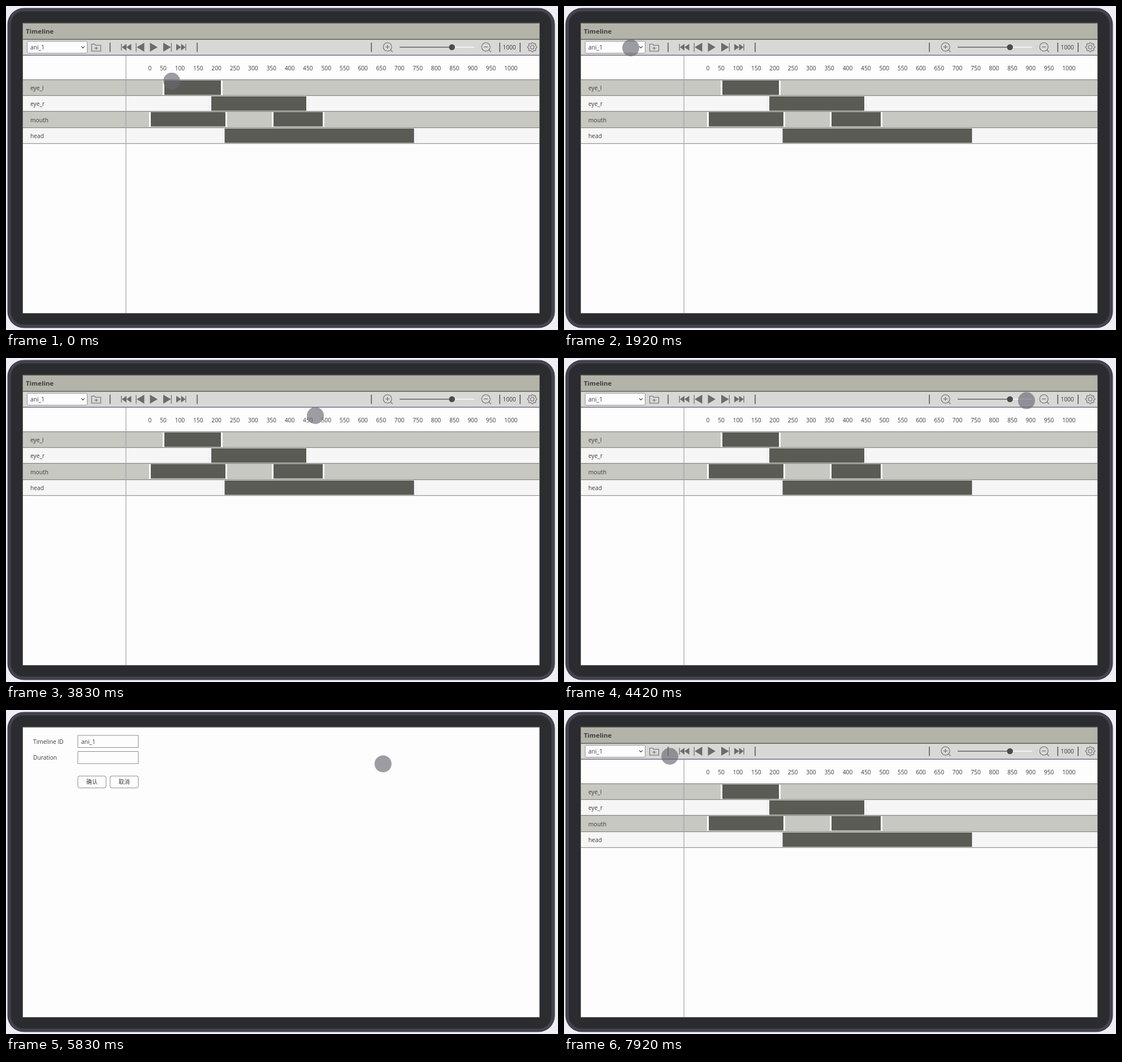
These frames come from a looping animation (976x574 px, 8000 ms). An HTML page with a canvas:

```html
<!DOCTYPE html>
<html lang="en">
<head>
<meta charset="utf-8">
<title>Timeline editor</title>
<style>
  html, body { margin: 0; width: 100%; height: 100%; overflow: hidden; background: #eeeef6; }
  canvas { display: block; width: 976px; height: 574px; }
</style>
</head>
<body>
<canvas id="stage" width="976" height="574"></canvas>
<script>
const ctx = document.getElementById('stage').getContext('2d');
const FONT = '"Open Sans", "Noto Sans", "Noto Sans CJK SC", sans-serif';
const INK = '#3c3c3c', ICON = '#6c6c6a', WHITE = '#fdfdfe';
const STEP = 250 / 3, STEPS = 96;

// Pointer path: [step, x, y]
const PATH = [
  [0, 293, 133], [9, 121, 72], [21, 121, 72], [24, 117, 75], [28, 112, 73],
  [36, 112, 73], [43, 640, 114], [46, 547, 102], [49, 385, 158], [54, 868, 66],
  [56, 853, 70], [59, 900, 53], [61, 936, 60], [62, 928, 67], [64, 930, 74],
  [66, 930, 74], [76, 182, 135], [82, 164, 130], [86, 164, 130], [91, 232, 96],
  [95, 187, 82]
];

function rect(x, y, w, h, color) {
  ctx.fillStyle = color;
  ctx.fillRect(x, y, w, h);
}

function round(x, y, w, h, r, fill, stroke) {
  ctx.beginPath();
  ctx.roundRect(x, y, w, h, r);
  if (fill) { ctx.fillStyle = fill; ctx.fill(); }
  if (stroke) { ctx.strokeStyle = stroke; ctx.lineWidth = 1; ctx.stroke(); }
}

function text(s, x, y, size = 10.25, weight = 400, align = 'left') {
  ctx.font = `${weight} ${size}px ${FONT}`;
  ctx.textAlign = align;
  ctx.fillStyle = INK;
  ctx.fillText(s, x, y);
}

function poly(points, close) {
  ctx.beginPath();
  points.forEach(([x, y]) => ctx.lineTo(x, y));
  if (close) ctx.closePath();
}

function line(points, color = ICON, width = 1.1) {
  poly(points);
  ctx.strokeStyle = color;
  ctx.lineWidth = width;
  ctx.stroke();
}

function disc(x, y, r, color) {
  ctx.beginPath();
  ctx.arc(x, y, r, 0, Math.PI * 2);
  ctx.fillStyle = color;
  ctx.fill();
}

function ring(x, y, r) {
  ctx.beginPath();
  ctx.arc(x, y, r, 0, Math.PI * 2);
  ctx.strokeStyle = ICON;
  ctx.lineWidth = 1.1;
  ctx.stroke();
}

// Triangle from its flat side to its tip
function arrow(base, tip, half) {
  poly([[base, 73 - half], [tip, 73], [base, 73 + half]], true);
  ctx.fillStyle = ICON;
  ctx.fill();
}

function tablet() {
  rect(0, 0, 976, 574, '#eeeef6');
  round(2.5, 3.5, 968, 567, 29, '#42444a');
  round(8.5, 9.5, 956, 555, 23, '#2b2c2f');
  rect(29, 29.5, 915, 515.5, '#62625a');
  rect(30, 31, 913, 513, WHITE);
}

function zoomIcon(x, plus) {
  ring(x, 72.5, 7.5);
  line([[x + 5.4, 77.8], [x + 9, 81.5]]);
  line([[x - 3.5, 72.5], [x + 3.5, 72.5]]);
  if (plus) line([[x, 69], [x, 76]]);
}

function gear(x, y) {
  const pts = [];
  for (let i = 0; i < 32; i++) {
    const r = i % 4 < 2 ? 8.3 : 6.5;
    const a = (i + (i % 2 ? -0.1 : 0.1)) * Math.PI / 16 - Math.PI / 32;
    pts.push([x + r * Math.cos(a), y + r * Math.sin(a)]);
  }
  poly(pts, true);
  ctx.strokeStyle = ICON;
  ctx.lineWidth = 1.1;
  ctx.stroke();
  ring(x, y, 3.2);
}

function toolbar() {
  rect(30, 31, 913, 27, '#b4b3aa');
  rect(30, 58, 913, 2, '#77776f');
  rect(30, 60, 913, 27, '#d8d8d6');
  rect(30, 86.5, 913, 1.5, '#77738a');
  text('Timeline', 35, 49, 11.4, 700);

  round(37.5, 62.5, 106, 21, 1, WHITE, '#96969a');
  text('ani_1', 43, 77);
  line([[133.3, 71.5], [136, 74.3], [138.7, 71.5]], '#444', 1.2);

  poly([[151.5, 67.5], [156.5, 67.5], [158.5, 69.5], [167.5, 69.5], [167.5, 80], [151.5, 80]], true);
  ctx.strokeStyle = ICON;
  ctx.lineWidth = 1.1;
  ctx.stroke();
  line([[156.5, 74.8], [162.5, 74.8]]);
  line([[159.5, 71.8], [159.5, 77.8]]);

  for (const x of [184, 338, 646, 873, 909]) rect(x - 0.7, 65, 1.4, 16.5, '#4a4a4a');

  rect(203.5, 67, 1.3, 12, ICON);
  arrow(213, 205, 6);
  arrow(221.5, 213, 6);
  rect(229.5, 65.5, 1.2, 15.5, ICON);
  arrow(244.5, 231, 8);
  arrow(254.5, 268, 8);
  arrow(278, 291.5, 8);
  rect(291.8, 65.5, 1.2, 15.5, ICON);
  arrow(301, 309.5, 6);
  arrow(309.5, 317.5, 6);
  rect(317.3, 67, 1.3, 12, ICON);

  zoomIcon(674.5, true);
  rect(696, 72.3, 92, 1.4, '#5c5c5c');
  rect(788, 72, 40, 2, '#f3f3f3');
  disc(788.5, 73, 5.3, '#4c4c4c');
  zoomIcon(848.5, false);
  text('1000', 890, 77, 10.25, 400, 'center');
  gear(930.5, 73);
}

function ruler() {
  const digit = 5.85, gap = 14.8;
  let x = 251.5;
  for (let v = 0; v <= 1000; v += 50) {
    const w = String(v).length * digit;
    text(String(v), x + w / 2, 113.5, 10.25, 400, 'center');
    x += w + gap;
  }
}

const TRACKS = [
  ['eye_l', [280, 380]],
  ['eye_r', [363, 531]],
  ['mouth', [256, 388], [473, 560]],
  ['head', [386.5, 721.5]]
];

function tracks() {
  TRACKS.forEach(([name, ...bars], i) => {
    const y = 130.5 + i * 28.4, top = Math.round(y);
    const odd = i % 2;
    rect(30, top, 913, 28, odd ? '#f6f6f7' : '#c7c8c1');
    rect(30, top - 1, 913, 1.2, '#85857d');
    text(name, 43, y + 18.2);
    for (const [a, b] of bars) {
      if (odd) rect(a - 3.5, top + 1, b - a + 7, 26, '#dedee0');
      rect(a - 3, top + 1, b - a + 6, 26, WHITE);
      rect(a, top + 1, b - a, 25.5, '#5b5b55');
    }
  });
  rect(30, 243, 913, 1.2, '#96968e');
  rect(211.5, 88, 1.2, 456, '#a2a2a4');
}

function dropdown(active, alpha) {
  ctx.save();
  ctx.globalAlpha = alpha;
  ctx.shadowColor = 'rgba(0,0,0,.28)';
  ctx.shadowBlur = 7;
  ctx.shadowOffsetY = 2;
  rect(37, 87, 107, 97, WHITE);
  ctx.shadowColor = 'transparent';
  rect(38, 91 + active * 21.6, 105, 21.6, '#e0dfe5');
  for (let i = 0; i < 4; i++) text('ani_' + (i + 1), 43, 105.7 + i * 21.7);
  ctx.restore();
}

function dialog() {
  text('Timeline ID', 48, 59.8);
  text('Duration', 48, 88.3);
  round(127, 45, 107, 21.5, 0, WHITE, '#8c8c8c');
  round(127, 73.5, 107, 21.5, 0, WHITE, '#8c8c8c');
  text('ani_1', 133, 60);
  round(127, 117, 50, 21, 3, WHITE, '#8c8c8c');
  round(184, 117, 50, 21, 3, WHITE, '#8c8c8c');
  text('确认', 152, 131.3, 10, 400, 'center');
  text('取消', 209, 131.3, 10, 400, 'center');
}

function pointer(k) {
  let i = PATH.findIndex(p => p[0] > k);
  if (i < 0) i = PATH.length - 1;
  const [t0, x0, y0] = PATH[i - 1], [t1, x1, y1] = PATH[i];
  const u = Math.min(1, (k - t0) / (t1 - t0));
  const e = u * u * (3 - 2 * u);
  disc(x0 + (x1 - x0) * e, y0 + (y1 - y0) * e, 15, 'rgba(105,104,114,.65)');
}

function draw(k) {
  tablet();
  if (k >= 67 && k < 85) {
    dialog();
  } else {
    toolbar();
    ruler();
    tracks();
    if (k >= 12 && k < 17) dropdown(0, k < 16 ? 1 : 0.4);
    if (k >= 31 && k < 36) dropdown(k > 31 ? 1 : 0, k < 34 ? 1 : k < 35 ? 0.4 : 0);
  }
  pointer(k);
}

const start = performance.now();
function tick(now) {
  const t = Math.max(0, now - start);
  draw(Math.floor((t + 4) / STEP) % STEPS);
  requestAnimationFrame(tick);
}
draw(0);
requestAnimationFrame(tick);
</script>
</body>
</html>
```
